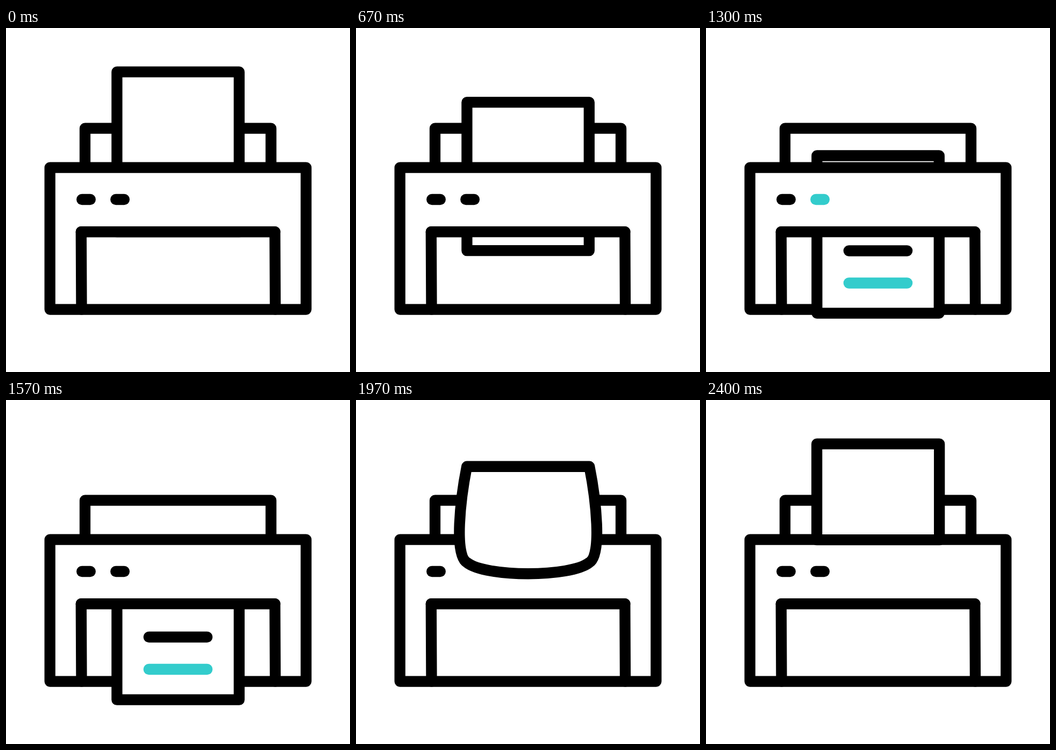
Animation, 640 px wide and 640 px high, one loop 2.5 s. Source, as an HTML page:

```html
<!DOCTYPE html>
<html lang="en">
<head>
<meta charset="utf-8">
<title>Printer</title>
<style>
html, body { margin: 0; width: 100%; height: 100%; overflow: hidden; background: #fff; }
svg { display: block; width: 100vw; height: 100vh; }
.ink { fill: #fff; stroke: #000; stroke-width: 20.3; stroke-linecap: round; stroke-linejoin: round; }
.teal { stroke: #33cccc; }
</style>
</head>
<body>
<svg viewBox="0 0 640 640">
  <defs>
    <clipPath id="slot"><rect y="379" width="640" height="261"/></clipPath>
  </defs>
  <g class="ink">
    <path d="M147 260V186.7H493V260"/>
    <path id="feed" d="M206.4 178V0H433.8V178"/>
    <rect x="81.7" y="259.7" width="476.6" height="263.9"/>
    <path fill="none" d="M140.5 523.5L139.8 379.2H500.3L501 523.5"/>
    <g clip-path="url(#slot)">
      <path id="page" d="M206.4 -220V0H433.8V-220"/>
      <g id="lines">
        <path d="M265.8 -60H374.2"/>
        <path class="teal" d="M265.8 0H374.2"/>
      </g>
    </g>
    <path d="M139.8 379.2H500.3"/>
    <path d="M141.2 319H156.8"/>
    <path id="lamp" d="M204.3 319H219.9"/>
    <path id="sheet"/>
  </g>
</svg>
<script>
const LOOP = 2500, TOP = 81.7, SLOT = 379.2;
const LEFT = 206.2, RIGHT = 434.2, HEIGHT = 178.5;
const LIFT = 1590, LAMP_BACK = 2230;
const [feed, page, lines, lamp, sheet] =
  ['feed', 'page', 'lines', 'lamp', 'sheet'].map(id => document.getElementById(id));

// Eased progress from time a to time b
const ease = (t, a, b) => {
  const p = Math.min(1, Math.max(0, (t - a) / (b - a)));
  return p * p * (3 - 2 * p);
};
const show = (el, on) => el.setAttribute('visibility', on ? 'visible' : 'hidden');
const moveY = (el, y) => el.setAttribute('transform', `translate(0 ${y})`);

// Sheet whose sides belly out and whose lower edge sags with bend
function sheetPath(bend) {
  const upper = 12 * bend, lower = 2 * upper, sag = HEIGHT + 28 * bend;
  return `M${LEFT} 0
    C${LEFT - upper} 60 ${LEFT - lower} 165 ${LEFT} ${HEIGHT}
    C${LEFT + 35} ${sag} ${RIGHT - 35} ${sag} ${RIGHT} ${HEIGHT}
    C${RIGHT + lower} 165 ${RIGHT + upper} 60 ${RIGHT} 0Z`;
}

function draw(t) {
  const nudge = ease(t, 318, 672), print = ease(t, 886, 1461);
  moveY(feed, TOP + 56.5 * nudge + 122.5 * print);
  moveY(page, SLOT + 35 * nudge + 143.5 * print);
  moveY(lines, 326 + 35 * nudge + 140 * print);

  const lifting = t >= LIFT;
  show(page, !lifting);
  show(lines, !lifting);
  show(sheet, lifting);
  show(lamp, !lifting || t >= LAMP_BACK);
  lamp.setAttribute('class', t >= 870 && t < 1430 ? 'teal' : '');

  const bend = ease(t, 1600, 1740) - ease(t, 1990, 2240);
  sheet.setAttribute('d', sheetPath(bend));
  moveY(sheet, SLOT - 315 * ease(t, 1670, 2087) + 17.5 * ease(t, 2100, 2400));
}

function tick() {
  draw(performance.now() % LOOP);
  requestAnimationFrame(tick);
}
tick();
</script>
</body>
</html>
```
